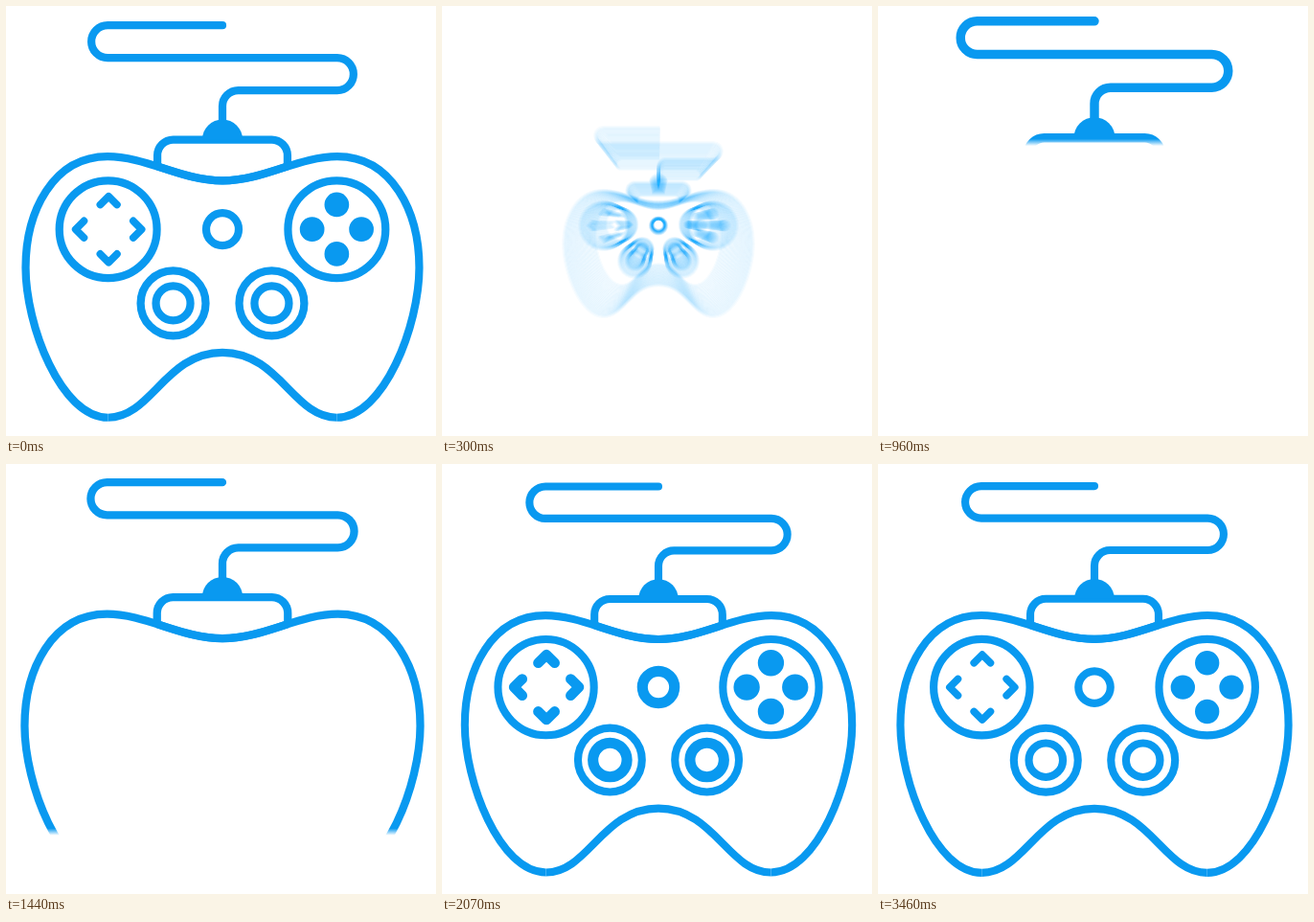
Animation of 449x449 px, one loop 3.49 s. Source, as an HTML page with a canvas:

```html
<!DOCTYPE html>
<html lang="en">
<head>
<meta charset="utf-8">
<title>Game controller</title>
<style>
html, body { margin: 0; width: 100%; height: 100%; overflow: hidden; background: #fff; }
canvas { display: block; width: 100vw; height: 100vh; }
</style>
</head>
<body>
<canvas id="stage" width="449" height="449"></canvas>
<script>
const LOOP = 3490, STEP = 30, SIZE = 449, MID = 226, EXIT = 3460;
const BLUE = '9,153,240';
const ctx = document.getElementById('stage').getContext('2d');

const cable = new Path2D(
  'M226 26H109.5a16.5 16.5 0 0 0 0 33H342.5a16.5 16.5 0 0 1 0 33H242a16 16 0 0 0-16 16V126');
const plug = new Path2D('M160 167V158a16 16 0 0 1 16-16H276a16 16 0 0 1 16 16V167');
const dome = new Path2D('M205.500 142a20.5 20.5 0 0 1 41 0z');
const dip = new Path2D('M160 169C182 176.500 203 183.500 226 183.500S270 176.500 292 169');

function symmetric(d) {
  const p = new Path2D(d);
  p.addPath(new Path2D(d), new DOMMatrix([-1, 0, 0, 1, 2 * MID, 0]));
  return p;
}
const sides = symmetric('M226 183.500C185 183.500 148 159 109.500 159C54 159 26.300 215 26.300 272C26.300 330 62 424 110 424');
const arch = symmetric('M110 424C154 424 168 358 226 358');

function circles(list) {
  const p = new Path2D();
  for (const [x, y, r] of list) {
    p.moveTo(x + r, y);
    p.arc(x, y, r, 0, Math.PI * 2);
  }
  return p;
}
const rings = circles([[110, 233, 49.5], [342, 233, 49.5], [176, 308, 33], [276, 308, 33]]);
const smallRings = circles([[226, 233, 16.5], [176, 308, 17.5], [276, 308, 17.5]]);
const dots = extra => circles([[342, 208], [342, 258], [317, 233], [367, 233]].map(p => [...p, 12.5 + extra]));
const arrows = new Path2D();
for (let i = 0; i < 4; i++) {
  const turn = new DOMMatrix().translate(110.5, 233).rotate(90 * i);
  arrows.addPath(new Path2D('M-8.500 -25L0 -33.500L8.500 -25'), turn);
}

const clamp = v => Math.max(0, Math.min(1, v));
const span = (t, a, b) => clamp((t - a) / (b - a));

// Blue with a soft edge that travels from y0 to y1
function wipe(c, p, y0, y1) {
  if (p >= 1) return `rgb(${BLUE})`;
  const edge = y0 + (y1 - y0) * p;
  const g = c.createLinearGradient(0, edge - 7 * Math.sign(y1 - y0), 0, edge);
  g.addColorStop(0, `rgba(${BLUE},1)`);
  g.addColorStop(1, `rgba(${BLUE},0)`);
  return g;
}

function line(c, path, width, cap = 'butt') {
  c.lineWidth = width;
  c.lineCap = cap;
  c.stroke(path);
}

function drawPad(c, t, scale) {
  c.save();
  c.translate(MID, MID);
  c.scale(scale, scale);
  c.translate(-MID, -MID);
  c.lineJoin = 'round';

  const cableIn = span(t, 570, 1080);
  if (cableIn > 0) {
    c.strokeStyle = c.fillStyle = wipe(c, cableIn, 20, 190);
    const bold = 1 - span(t, 1080, 1260);
    line(c, cable, 8 + bold, 'round');
    line(c, plug, 8 + bold);
    line(c, dip, 8);
    c.fill(dome);
  }
  const sidesIn = span(t, 1080, 1525);
  if (sidesIn > 0) {
    c.strokeStyle = wipe(c, sidesIn, 155, 436);
    line(c, sides, 8);
  }
  const archIn = span(t, 1525, 1650);
  if (archIn > 0) {
    c.strokeStyle = wipe(c, archIn, 428, 346);
    line(c, arch, 8);
  }
  const keysIn = span(t, 1525, 1965);
  if (keysIn > 0) {
    c.strokeStyle = c.fillStyle = wipe(c, keysIn, 178, 354);
    const bold = 1 - span(t, 2070, 2340);
    line(c, rings, 8);
    line(c, smallRings, 8 + 3 * bold);
    line(c, arrows, 7.5 + 3 * bold, 'round');
    c.fill(dots(bold));
  }
  c.restore();
}

// Swell, then collapse: [ms since start, scale]
const exitSteps = [[0, 1], [60, 1.029], [120, 1.059], [180, 1.09], [225, 1.1],
  [270, 1], [315, 0.75], [345, 0.495], [375, 0.33], [420, 0]];

function exitScale(u) {
  for (let i = 1; i < exitSteps.length; i++) {
    const [a, from] = exitSteps[i - 1], [b, to] = exitSteps[i];
    if (u <= b) return from + (to - from) * span(u, a, b);
  }
  return 0;
}

const layer = document.createElement('canvas');
layer.width = layer.height = SIZE;
drawPad(layer.getContext('2d'), LOOP, 1);

function drawExit(u) {
  if (u <= 225) return drawPad(ctx, LOOP, exitScale(u));
  const near = exitScale(u - 15), far = exitScale(u + 15);
  const n = 30;
  // Average many sizes for a zoom blur
  ctx.save();
  ctx.globalCompositeOperation = 'lighter';
  ctx.globalAlpha = 1 / n;
  for (let i = 0; i < n; i++) {
    const s = near + (far - near) * i / (n - 1);
    if (s > 0) ctx.drawImage(layer, MID * (1 - s), MID * (1 - s), SIZE * s, SIZE * s);
  }
  ctx.restore();
}

function render(ms) {
  const now = ms % LOOP;
  const t = now >= EXIT ? EXIT : Math.floor(now / STEP) * STEP;
  ctx.clearRect(0, 0, SIZE, SIZE);
  if (t >= EXIT || t < 540) drawExit((t - EXIT + STEP + LOOP) % LOOP);
  else drawPad(ctx, t, 1 + 0.0645 * (1 - span(t, 570, 2430)));
}

const start = performance.now();
function tick(now) {
  render(Math.max(0, now - start));
  requestAnimationFrame(tick);
}
render(0);
requestAnimationFrame(tick);
</script>
</body>
</html>
```
